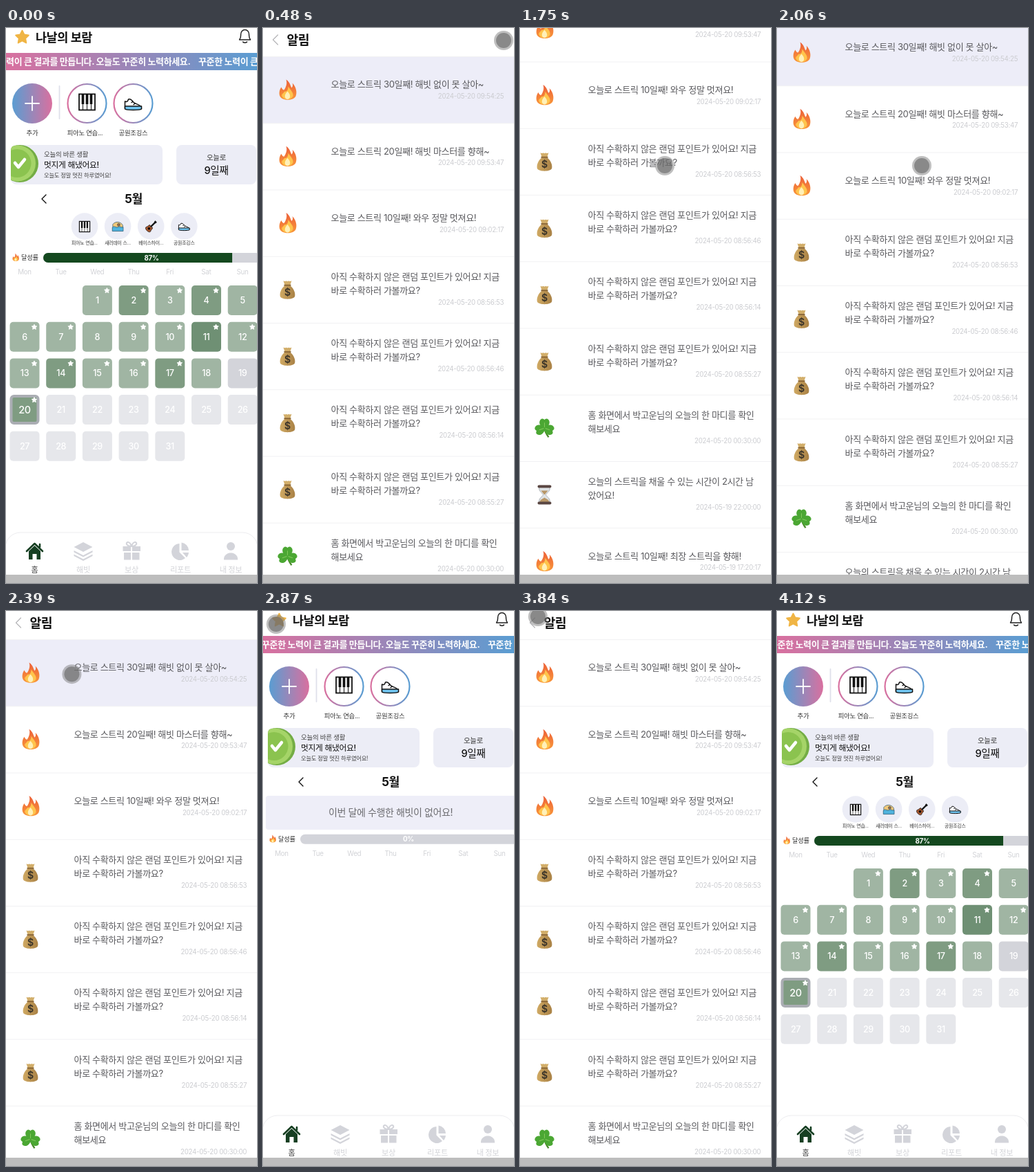
These frames come from a looping animation (364 by 802 pixels, 4.17 s). An HTML page:

```html
<!DOCTYPE html>
<html lang="ko">
<head>
<meta charset="utf-8">
<style>
html, body { margin: 0; width: 100%; height: 100%; overflow: hidden; background: #fff; }
svg { display: block; width: 100vw; height: 100vh; }
text { font-family: Inter, "Noto Sans CJK KR", "Noto Sans CJK", sans-serif; letter-spacing: -.028em; white-space: pre; }
</style>
</head>
<body>
<svg id="stage" viewBox="0 0 364 802">
<defs>
  <linearGradient id="pinkBlue"><stop stop-color="#d9709f"/><stop offset="1" stop-color="#5a9dd2"/></linearGradient>
  <linearGradient id="bluePink"><stop stop-color="#5a9dd2"/><stop offset="1" stop-color="#d9709f"/></linearGradient>
  <linearGradient id="fireFill" x2="0" y2="1"><stop stop-color="#ec5f38"/><stop offset="1" stop-color="#f9973a"/></linearGradient>
  <linearGradient id="bagFill"><stop stop-color="#d0aa64"/><stop offset="1" stop-color="#a98145"/></linearGradient>
  <clipPath id="cardClip"><rect x="7" y="169" width="220" height="57" rx="8"/></clipPath>
  <g id="fire">
    <path fill="url(#fireFill)" d="M-2-15C4-11 4-6 6-3C8-5 8-8 7-10C13-4 14 4 12 9C9 16-8 16-11 9C-13 4-11-1-9-4C-8-2-7 0-5 0C-2-4 0-10-2-15Z"/>
    <path fill="#ffc44c" d="M1-5C5 1 9 4 8 9C5 15-5 15-8 9C-9 6-6 5-4 2C-1 3 1 0 1-5Z"/>
    <path fill="#fff0b8" d="M0 2C5 7 5 12.500 0 13.500C-5 12.500-5 7 0 2Z"/>
  </g>
  <g id="bag">
    <path fill="url(#bagFill)" d="M-4-6C-9-2-12 5-10.500 10C-8 14.500 8 14.500 10.500 10C12 5 9-2 4-6Z"/>
    <path fill="#d2ae6a" d="M-4-7L-6-13C-3-11-2-14 0-12C2-14 3-11 6-13L4-7Z"/>
    <path stroke="#85602f" stroke-width="1.800" d="M-5-6.500H5"/>
    <text y="9" font-size="14" font-weight="700" fill="#40382b" text-anchor="middle">$</text>
  </g>
  <g id="clover">
    <path fill="none" stroke="#4c8a2c" stroke-width="2.200" d="M0 1C1 6 3 9 6 13"/>
    <g id="leaf"><path fill="#4ba733" d="M0 1C-8-3-9-10-5-13C-3-14.500-1-13 0-12C1-13 3-14.500 5-13C9-10 8-3 0 1Z"/><path stroke="#83c95c" d="M0-1V-8"/></g>
    <use href="#leaf" transform="rotate(108)"/><use href="#leaf" transform="rotate(-108)"/>
  </g>
  <g id="hourglass">
    <path fill="#dfe3e6" stroke="#a9afb4" d="M-8-11H8C8-4 3-3 2 0C3 3 8 4 8 11H-8C-8 4-3 3-2 0C-3-3-8-4-8-11Z"/>
    <path fill="#b79667" d="M-5-6H5L0 0ZM-7 11C-6 6-2 6 0 4C2 6 6 6 7 11Z"/>
    <path stroke="#5a4642" stroke-width="4" stroke-linecap="round" d="M-8-12H8M-8 12H8"/>
  </g>
  <g id="piano" stroke="#111">
    <rect x="-11.500" y="-11.500" width="23" height="23" fill="#fff" stroke-width="1.800"/>
    <path d="M-6 0V11M0 0V11M6 0V11"/><path stroke-width="3.600" d="M-6-11V3M0-11V3M6-11V3"/>
  </g>
  <g id="shoe" stroke="#111" stroke-width="1.500" stroke-linejoin="round">
    <path fill="#fff" d="M-12-4C-10-3-8-3-7-7C-4-8-2-6 0-3C4 1 11 0 12 6H-12Z"/>
    <path fill="#6fc3ee" d="M-12 3H12V7C10 9-10 9-12 7Z"/><path d="M-3-2L0-4M0 1L3-1"/>
  </g>
  <g id="surf" stroke="#24506a">
    <path fill="#f2c879" d="M-11-5C-6-12 6-12 11-3L11 9H-11Z"/>
    <path fill="#4fb3dd" d="M-12 2C-7-3-5 3 0 1C5-2 7 3 12 1V10H-12Z"/><circle cx="2" cy="-4" r="3" fill="#a86b3c"/>
  </g>
  <g id="guitar" transform="rotate(45)" stroke="#111">
    <path stroke-width="3.500" d="M0 2V-14"/><path stroke-width="5" d="M0-12V-16"/>
    <path fill="#a5562d" d="M-4-1C-1 1 1 1 4-1C7 2 4 4 7 8C8 14-8 14-7 8C-4 4-7 2-4-1Z"/><circle cy="6" r="2.200"/>
  </g>
</defs>
<g id="home"></g>
<g id="list"></g>
<rect y="790" width="364" height="12" fill="#bdbdbd"/>
<g id="touch"><circle r="14" fill="#808080" opacity=".5"/><circle r="11" fill="#666" opacity=".6"/></g>
</svg>
<script>
const LOOP = 4170, PERIOD = 328, SPEED = 0.05;
const $ = id => document.getElementById(id);
const CARD = '#ecedf6', PALE = '#d3d4da';

const text = (x, y, str, size, fill = '#222', weight = 400, anchor = 'start') =>
  `<text x="${x}" y="${y}" font-size="${size}" fill="${fill}" font-weight="${weight}" text-anchor="${anchor}">${str}</text>`;
const mid = (x, y, str, size, fill, weight) => text(x, y, str, size, fill, weight, 'middle');
const rect = (x, y, w, h, fill, r = 0, more = '') =>
  `<rect x="${x}" y="${y}" width="${w}" height="${h}" rx="${r}" fill="${fill}" ${more}/>`;
const circle = (x, y, r, fill, more = '') => `<circle cx="${x}" cy="${y}" r="${r}" fill="${fill}" ${more}/>`;
const line = (d, color, w) =>
  `<path d="${d}" fill="none" stroke="${color}" stroke-width="${w}" stroke-linecap="round" stroke-linejoin="round"/>`;
const icon = (id, x, y, s = 1) => `<use href="#${id}" transform="translate(${x} ${y}) scale(${s})"/>`;
const star = (x, y, r, fill) => {
  const pts = Array.from({ length: 10 }, (_, i) => {
    const a = i * Math.PI / 5, k = i % 2 ? r * .5 : r;
    return `${(x + k * Math.sin(a)).toFixed(2)},${(y - k * Math.cos(a)).toFixed(2)}`;
  });
  return `<polygon points="${pts.join(' ')}" fill="${fill}" stroke="${fill}" stroke-width="${r * .2}" stroke-linejoin="round"/>`;
};

function header() {
  const slogan = '꾸준한 노력이 큰 결과를 만듭니다. 오늘도 꾸준히 노력하세요.';
  return star(23.5, 13.5, 9.8, '#f0b545') + text(43, 19.5, '나날의 보람', 17.5, '#111', 600) +
    line('M338.500 17H354.500C352 14 352.500 12 352.500 9.500C352.500 0 340.500 0 340.500 9.500C340.500 12 341 14 338.500 17ZM343.500 20C345 21.800 348 21.800 349.500 20', '#222', 1.5) +
    rect(0, 36, 364, 25, 'url(#pinkBlue)') +
    `<g id="marquee">${[0, PERIOD].map(x => text(x, 53, slogan, 13, '#fff', 700)).join('')}</g>`;
}

function shortcuts() {
  const ring = x => circle(x, 109, 28, '#fff', 'stroke="url(#pinkBlue)" stroke-width="2.200"');
  return circle(38, 109, 29, 'url(#bluePink)') + line('M28 109H48M38 99V119', '#fff', 1.8) +
    line('M77.500 84V131', '#dfe0ea', 1.8) + ring(117.5) + ring(184.5) +
    icon('piano', 117.5, 107) + icon('shoe', 184.5, 110) +
    mid(38, 155, '추가', 9.5, '#333') + mid(114.5, 155, '피아노 연습...', 9.4, '#333') +
    mid(184.5, 155, '공원조깅스', 9.4, '#333');
}

function cards() {
  return rect(7, 169, 220, 57, CARD, 8) + rect(247, 169, 116, 57, CARD, 8) +
    `<g clip-path="url(#cardClip)">${circle(20, 196, 27, '#74ad45')}${circle(17, 195.5, 26, '#a5d468')}${circle(16, 195.5, 20.5, '#8bc34f')}</g>` +
    line('M13 195L18 201L27 190', '#fff', 4.5) +
    text(55, 186, '오늘의 바른 생활', 9.5, '#444') +
    text(55, 202, '멋지게 해냈어요!', 11.8, '#111', 500) +
    text(55, 216, '오늘도 정말 멋진 하루였어요!', 8.3, '#444') +
    mid(305, 190.5, '오늘로', 10.4, '#333') + mid(305, 211, '9일째', 14.6, '#111', 500) +
    line('M58 241L52 247L58 253', '#111', 1.4) + mid(185, 253, '5월', 17.2, '#111', 700);
}

function progress(percent, y) {
  const done = 315 * percent / 100;
  const bar = done ? `<path fill="#14481f" d="M${54 + done} ${y}H61a7 7 0 0 0 0 14H${54 + done}Z"/>` : '';
  const days = ['Mon', 'Tue', 'Wed', 'Thu', 'Fri', 'Sat', 'Sun'];
  return icon('fire', 14, y + 6.5, .38) + text(22, y + 10, '달성률', 9.3, '#333') +
    rect(54, y, 315, 14, PALE, 7) + bar + mid(211, y + 10.7, percent + '%', 9.8, '#fff', 700) +
    days.map((d, i) => mid(27 + 52.65 * i, y + 31, d, 9.8, '#d2d3d7')).join('');
}

function calendar() {
  const plain = [5, 8, 18], dark = [2, 4, 14, 17, 20];
  let out = '';
  for (let day = 1; day <= 31; day++) {
    const cell = day + 1, x = 5.5 + 52.7 * (cell % 7), y = 372 + 52.7 * Math.floor(cell / 7);
    const today = day == 20;
    const fill = day > 20 ? '#e6e7eb' : day == 19 ? PALE : day == 11 ? '#6f9074' : dark.includes(day) ? '#7f9c82' : '#a0b5a3';
    out += today ? rect(x + 2, y + 2, 39, 39, fill, 4, 'stroke="#aaadb3" stroke-width="4"') : rect(x, y, 43, 43, fill, 5);
    out += mid(x + 21.5, y + (today ? 27 : 25.8), day, today ? 14.5 : 12.6, '#fff', 500);
    if (day < 19 && !plain.includes(day) || today) out += star(x + 35.5, y + 7.5, 4, '#fff');
  }
  return out;
}

function month() {
  const habits = [['piano', '피아노 연습...'], ['surf', '새러데이 스...'], ['guitar', '베이스하이...'], ['shoe', '공원조깅스']];
  return habits.map(([id, name], i) => {
    const x = 114 + 48.1 * i;
    return circle(x, 286.5, 19.3, CARD) + icon(id, x, 287, .66) + mid(x, 313, name, 6.9, '#333');
  }).join('') + progress(87, 325) + calendar();
}

function emptyMonth() {
  return rect(4, 267, 366, 49, '#eeeef8', 4) +
    mid(185, 296, '이번 달에 수행한 해빗이 없어요!', 14, '#6c6c70') + progress(0, 322.7);
}

function nav() {
  const names = ['홈', '해빗', '보상', '리포트', '내 정보'], xs = [41.5, 112, 182, 253, 326];
  const shape = (d, fill) => `<path d="${d}" fill="${fill}"/>`;
  return rect(-1, 729, 366, 100, '#fff', 22, 'stroke="#ececef"') +
    shape('M33 756L41.500 748L50 756V768H44.500V760H38.500V768H33Z', '#163f22') +
    line('M30 756L41.500 745L53 756M49 746V750', '#163f22', 2.6) +
    shape('M112 743L125.500 750L112 757L98.500 750ZM98.500 755L112 762L125.500 755V757.500L112 764.500L98.500 757.500ZM98.500 760.500L112 767.500L125.500 760.500V763L112 770L98.500 763Z', PALE) +
    shape('M169.500 749H181V756H169.500ZM183 749H195V756H183ZM171 758H181V768.500H171ZM183 758H193.500V768.500H183Z', PALE) +
    line('M182 749C174 749 173 743 177 743C180 743 181 746 182 749C183 746 184 743 187 743C191 743 190 749 182 749', PALE, 2) +
    shape('M251.500 745V757.500L260 766A12 12 0 1 1 251.500 745ZM254.500 743.500A12 12 0 0 1 265 755H254.500ZM256 758H265A12 12 0 0 1 262 765Z', PALE) +
    circle(326, 749, 6, PALE) + shape('M316 768.500C315 755 337 755 336 768.500Z', PALE) +
    names.map((n, i) => mid(xs[i], 787, n, 11.2, i ? '#d3d4d8' : '#444', 500)).join('');
}

function notices() {
  const point = '아직 수확하지 않은 랜덤 포인트가 있어요! 지금|바로 수확하러 가볼까요?';
  const rows = [
    ['fire', '오늘로 스트릭 30일째! 해빗 없이 못 살아~', '20 09:54:25'],
    ['fire', '오늘로 스트릭 20일째! 해빗 마스터를 향해~', '20 09:53:47'],
    ['fire', '오늘로 스트릭 10일째! 와우 정말 멋져요!', '20 09:02:17'],
    ['bag', point, '20 08:56:53'],
    ['bag', point, '20 08:56:46'],
    ['bag', point, '20 08:56:14'],
    ['bag', point, '20 08:55:27'],
    ['clover', '홈 화면에서 박고운님의 오늘의 한 마디를 확인|해보세요', '20 00:30:00'],
    ['hourglass', '오늘의 스트릭을 채울 수 있는 시간이 2시간 남|았어요!', '19 22:00:00'],
    ['fire', '오늘로 스트릭 10일째! 최장 스트릭을 향해!', '19 17:20:17']
  ];
  return rect(0, 0, 364, 1100, '#fff') + line('M21.500 10L14.500 17L21.500 24', '#b5b5b8', 1.2) +
    text(34.5, 23.5, '알림', 18.3, '#111', 600) +
    '<rect id="unread" y="41.500" width="364" height="96" fill="#ededf8"/>' +
    rows.map(([id, msg, date], i) => {
      const y = 41 + 96.25 * i, parts = msg.split('|'), two = parts.length > 1;
      return rect(0, y, 364, 1, '#f1f1f3') + icon(id, 35.5, y + 48.5) +
        parts.map((p, k) => text(98.5, y + (two ? 34 : 45.3) + 20 * k, p, 13.05, '#5a5a5e')).join('') +
        text(349.2, y + (two ? 70.2 : 61), '2024-05-' + date, 9.7, '#cbccd0', 400, 'end');
    }).join('');
}

$('home').innerHTML = header() + shortcuts() + cards() +
  `<g id="month">${month()}</g><g id="empty">${emptyMonth()}</g>` + nav();
$('list').innerHTML = notices();

// Page visits: start time, page, marquee shift at start
const visits = [[0, 'home', 49], [450, 'list'], [2830, 'home', 0], [3480, 'list'], [3900, 'home', 0]];
const pointer = [
  [60, 380, 40], [300, 349, 18], [1010, 349, 18], [1330, 234, 138], [1450, 210, 199], [2120, 210, 199],
  [2560, 24, 24], [2660, 24, 24], [2760, 19, 19], [2930, 19, 19], [3350, 346, 16], [3500, 346, 16],
  [3780, 26, 12], [3840, 26, 8], [3920, 26, 8], [4060, 30, -20]
];
const clamp = v => Math.max(0, Math.min(1, v));
const ease = (t, a, b) => { const p = clamp((t - a) / (b - a)); return p * p * (3 - 2 * p); };

function pointerAt(t) {
  let i = pointer.findIndex(k => k[0] > t);
  if (i < 0) i = pointer.length - 1;
  if (i == 0) i = 1;
  const [ta, xa, ya] = pointer[i - 1], [tb, xb, yb] = pointer[i], p = clamp((t - ta) / (tb - ta));
  return [xa + (xb - xa) * p, ya + (yb - ya) * p];
}
const show = (id, on) => $(id).setAttribute('display', on ? 'inline' : 'none');
const move = (id, x, y) => $(id).setAttribute('transform', `translate(${x} ${y})`);

function draw(t) {
  const [start, page, shift] = visits.filter(v => v[0] <= t).pop();
  const age = t - start, loading = start > 0 && age < 90;
  show('home', page == 'home');
  show('list', page == 'list');
  if (page == 'home') {
    show('month', !loading);
    show('empty', loading);
    move('marquee', -shift - age * SPEED, 0);
  } else {
    show('unread', t < 3000);
    move('list', 0, Math.round(-200 * (ease(t, 1540, 1793) - ease(t, 1930, 2129))));
  }
  move('touch', ...pointerAt(t));
}

function tick() {
  draw(performance.now() % LOOP);
  requestAnimationFrame(tick);
}
tick();
</script>
</body>
</html>
```
